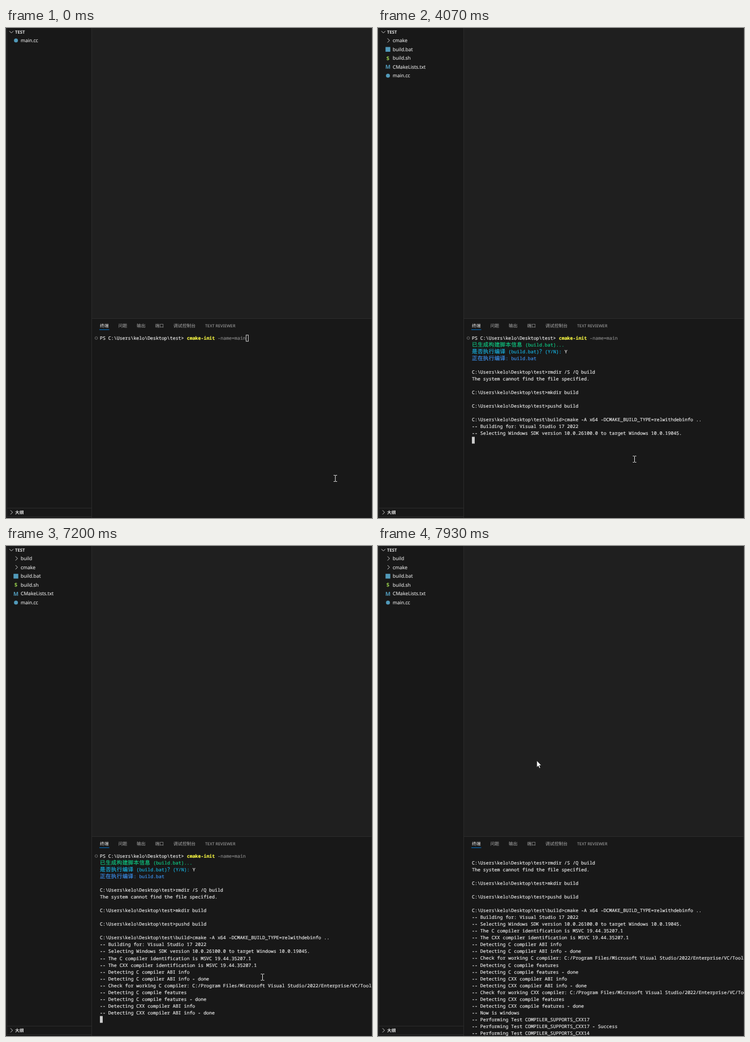
Write an HTML page that moves like this. It is 647 px wide and 866 px high and loops after 8 s.

```html
<!DOCTYPE html>
<html lang="zh-CN">
<head>
<meta charset="utf-8">
<title>Terminal build</title>
<style>
html, body { margin: 0; width: 100%; height: 100%; overflow: hidden; background: #181818; }
svg { display: block; width: 647px; height: 866px; text-rendering: geometricPrecision; }
text { white-space: pre; fill: #e2e2e2; }
.ui { font: 8.53px "Noto Sans", "Open Sans", sans-serif; stroke: #e2e2e2; stroke-width: .12; }
.head { font: bold 7.7px "Noto Sans", "Noto Sans CJK SC", sans-serif; }
.tab { font: 7.85px "Noto Sans CJK SC", sans-serif; fill: #ababab; }
.tab.en { font: 7.33px "Noto Sans", "Open Sans", sans-serif; }
.tab.on { fill: #f2f2f2; }
.term text { font: 8.267px "Noto Sans Mono", monospace; stroke-width: .2; }
.term .cjk { font: 9.6px "Noto Sans CJK SC", sans-serif; letter-spacing: .32px; }
.chev { fill: none; stroke: #ccc; stroke-width: 1; }
</style>
</head>
<body>
<svg id="stage" viewBox="0 0 647 866"></svg>
<script>
const NS = "http://www.w3.org/2000/svg";
const LOOP = 8000;
const CELL = 4.96, ROW = 12.02, LEFT = 166, TOP = 542.2;
const stage = document.getElementById("stage");

function add(parent, tag, attrs = {}, text) {
  const el = document.createElementNS(NS, tag);
  for (const k in attrs) el.setAttribute(k, attrs[k]);
  if (text !== undefined) el.textContent = text;
  parent.appendChild(el);
  return el;
}
const rect = (p, x, y, width, height, fill) => add(p, "rect", { x, y, width, height, fill });
const label = (p, cls, x, y, s) => add(p, "text", { class: cls, x, y }, s);
const show = (el, on) => el.setAttribute("display", on ? "inline" : "none");

// Panels and borders
rect(stage, 0, 0, 647, 866, "#181818");
rect(stage, 152, 0, 495, 513, "#1f1f1f");
rect(stage, 1, 0, 1, 866, "#2b2b2b");
rect(stage, 151, 0, 1, 866, "#2b2b2b");
rect(stage, 152, 513, 495, 1, "#2b2b2b");
rect(stage, 646, 0, 1, 866, "#2b2b2b");
rect(stage, 2, 848, 149, 1, "#2b2b2b");
rect(stage, 2, 863, 149, 1, "#2b2b2b");

// Sidebar
const right = (p, x, y) => add(p, "path", { class: "chev", d: `M${x} ${y - 3.6}l3.6 3.6-3.6 3.6` });
add(stage, "path", { class: "chev", d: "M6 5.4l3.5 3.5 3.5-3.5" });
label(stage, "head", 16, 9.8, "TEST");
right(stage, 8, 856);
label(stage, "head", 16, 859, "大纲");

const icons = {
  folder: g => right(g, 16.8, 22),
  square: g => rect(g, 13.3, 18, 8.4, 8.4, "#519aba"),
  circle: g => add(g, "circle", { cx: 17.6, cy: 22, r: 3.5, fill: "#519aba" }),
  letter: (g, s, fill) => add(g, "text", {
    x: 17.6, y: 25.4, "text-anchor": "middle",
    style: `font:bold 9.6px "Noto Sans",sans-serif;fill:${fill}`
  }, s)
};
function entry(name, icon, ...rest) {
  const g = add(stage, "g");
  icons[icon](g, ...rest);
  label(g, "ui", 26, 25.1, name);
  return { name, g };
}
const files = [
  entry("build", "folder"),
  entry("cmake", "folder"),
  entry("build.bat", "square"),
  entry("build.sh", "letter", "$", "#8dc149"),
  entry("CMakeLists.txt", "letter", "M", "#519aba"),
  entry("main.cc", "circle")
];

// Panel tabs
[[166, "终端", " on"], [198.5, "问题"], [231, "输出"], [263.5, "端口"], [296, "调试控制台"],
 [352, "TEXT REVIEWER", " en"]]
  .forEach(([x, s, cls = ""]) => label(stage, "tab" + cls, x, 529, s));
rect(stage, 165, 532.6, 17.5, 1, "#0078d4");

// Terminal text: a line is a string or a list of [text, colour, bold]
const GREEN = "#0fc480", CYAN = "#17addb", BLUE = "#3b8eea";
const home = "C:\\Users\\kelo\\Desktop\\test";
const tools = "C:/Program Files/Microsoft Visual Studio/2022/Enterprise/VC/Tools";
const lines = [
  [["PS " + home + "> "], ["cmake-init", "#f5f543", true], [" -name=main", "#828282"]],
  [["已生成构建脚本信息", GREEN], [" (build.bat)...", GREEN]],
  [["是否执行编译", CYAN], [" (build.bat)", CYAN], ["？", CYAN], ["(Y/N): ", CYAN], ["Y"]],
  [["正在执行编译", BLUE], [": build.bat", BLUE]],
  "",
  home + ">rmdir /S /Q build",
  "The system cannot find the file specified.",
  "",
  home + ">mkdir build",
  "",
  home + ">pushd build",
  "",
  home + "\\build>cmake -A x64 -DCMAKE_BUILD_TYPE=relwithdebinfo ..",
  "-- Building for: Visual Studio 17 2022",
  "-- Selecting Windows SDK version 10.0.26100.0 to target Windows 10.0.19045.",
  "-- The C compiler identification is MSVC 19.44.35207.1",
  "-- The CXX compiler identification is MSVC 19.44.35207.1",
  "-- Detecting C compiler ABI info",
  "-- Detecting C compiler ABI info - done",
  "-- Check for working C compiler: " + tools,
  "-- Detecting C compile features",
  "-- Detecting C compile features - done",
  "-- Detecting CXX compiler ABI info",
  "-- Detecting CXX compiler ABI info - done",
  "-- Check for working CXX compiler: " + tools,
  "-- Detecting CXX compile features",
  "-- Detecting CXX compile features - done",
  "-- Now is windows",
  "-- Performing Test COMPILER_SUPPORTS_CXX17",
  "-- Performing Test COMPILER_SUPPORTS_CXX17 - Success",
  "-- Performing Test COMPILER_SUPPORTS_CXX14"
];
const term = add(stage, "g", { class: "term" });
const dot = add(term, "circle", { cx: 159.6, cy: 548, r: 2.3, fill: "none", stroke: "#6e6e6e" });
let answer;
const rows = lines.map((line, i) => {
  const el = add(term, "text", { y: TOP + 9 + ROW * i });
  let col = 0;
  for (const [s, ink = "#e6e6e6", bold] of typeof line === "string" ? [[line]] : line) {
    const wide = s.charCodeAt(0) > 0x2e80;
    const span = add(el, "tspan", {
      x: LEFT + col * CELL, class: wide ? "cjk" : "",
      style: `fill:${ink};stroke:${ink}` + (bold ? ";font-weight:bold" : "")
    }, s);
    if (s === "Y") answer = span;
    col += s.length * (wide ? 2 : 1);
  }
  return el;
});
const caret = add(term, "rect", { stroke: "#ccc" });

// Mouse pointers
const beam = add(stage, "path", {
  d: "M-3-5.5h2.2l.8.7.8-.7h2.2M0-5v10M-3 5.5h2.2l.8-.7.8.7h2.2", fill: "none", stroke: "#e4e4e4"
});
const arrow = add(stage, "path", {
  d: "M0 0v11.4l2.6-2.4 1.8 4.2 1.9-.8-1.8-4.1h3.5z", fill: "#fff", stroke: "#000", "stroke-width": .5
});

// [time, lines printed, caret column]; the caret sits on the row after the last printed line
const output = [
  [0, 0, 52], [2670, 1, 0], [2730, 2, 33], [3670, 2, 34], [4000, 4, 0], [4070, 15, 0],
  [5070, 16, 0], [5730, 18, 0], [6400, 20, 0], [6470, 23, 0], [7200, 24, 0],
  [7270, 29, 0], [7930, 31, 0]
];
const mouse = [
  [0, 582.2, 796], [70, 563, 782], [130, 554, 776], [1870, 487.5, 768.5], [1930, 453.5, 762],
  [7600, 449, 751], [7670, 421, 692], [7730, 371, 576], [7800, 321, 462],
  [7870, 293.5, 404], [7930, 280.8, 379.5]
];
const at = (keys, t) => keys.filter(k => k[0] <= t).pop();

function draw(t) {
  const [, count, col] = at(output, t);
  const top = Math.max(0, count - 27);
  const open = col > 0;
  rows.forEach((el, i) => show(el, i >= top && i < count + (open ? 1 : 0)));
  show(answer, t >= 3670);
  show(dot, top === 0);
  term.setAttribute("transform", `translate(0 ${-top * ROW})`);

  const focus = t >= 2130, inset = focus ? 0 : .5;
  caret.setAttribute("x", LEFT + col * CELL + inset);
  caret.setAttribute("y", TOP + count * ROW + inset);
  caret.setAttribute("width", CELL - 2 * inset);
  caret.setAttribute("height", 12 - 2 * inset);
  caret.setAttribute("fill", focus ? "#ccc" : "none");
  caret.setAttribute("stroke-width", focus ? 0 : 1);

  let n = 0;
  for (const { name, g } of files) {
    const on = name === "main.cc" || t >= (name === "build" ? 4600 : 3270);
    show(g, on);
    if (on) g.setAttribute("transform", `translate(0 ${15.58 * n++})`);
  }

  const [, x, y] = at(mouse, t);
  show(beam, y > 535);
  show(arrow, y <= 535);
  for (const el of [beam, arrow]) el.setAttribute("transform", `translate(${x} ${y})`);
}

const start = performance.now();
function tick() {
  draw((performance.now() - start) % LOOP);
  requestAnimationFrame(tick);
}
tick();
</script>
</body>
</html>
```
